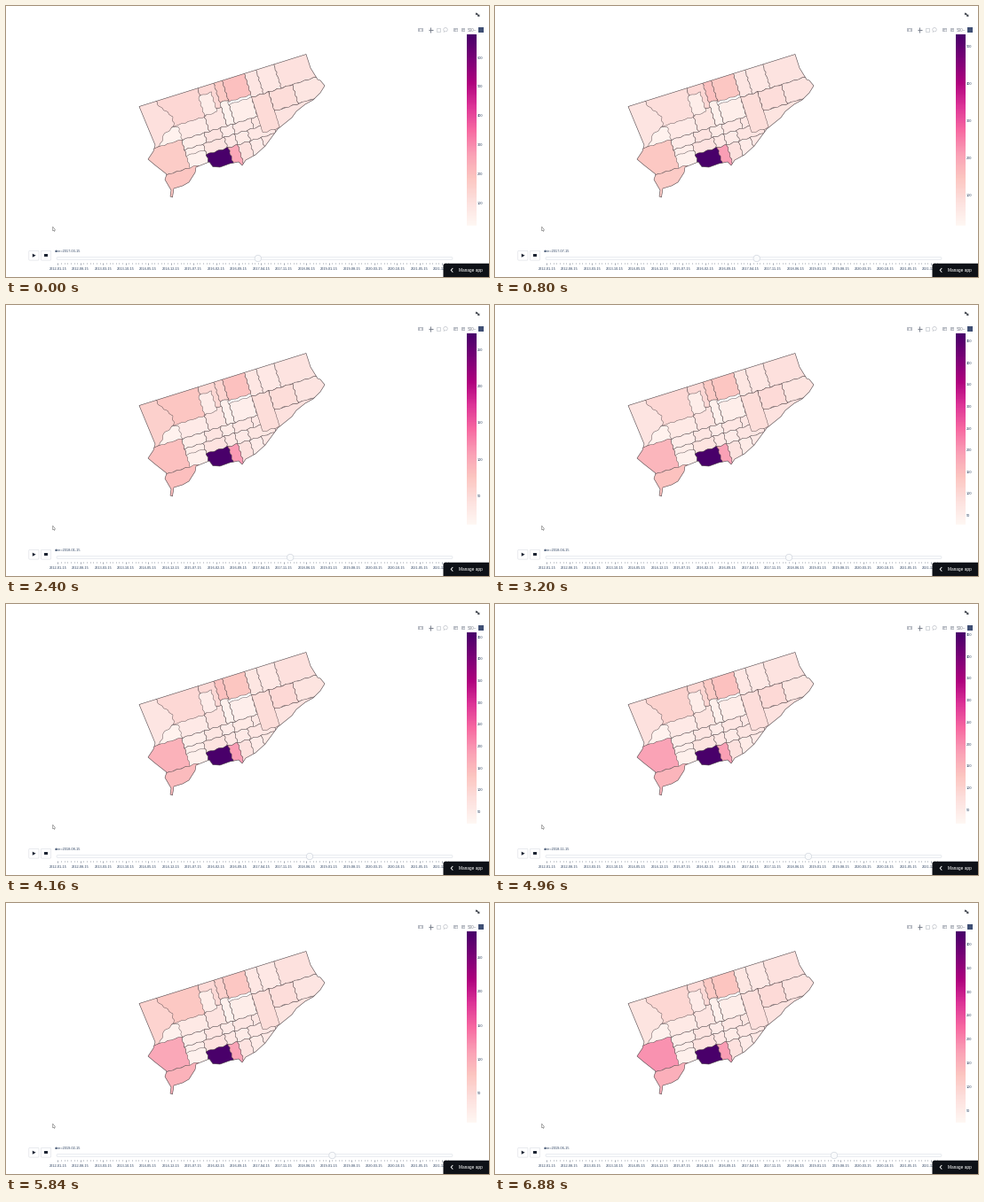
These frames come from a looping animation (544 by 306 pixels, 6.96 s). A matplotlib script:

```python
import numpy as np
import matplotlib
import matplotlib.pyplot as plt
from matplotlib.animation import FuncAnimation
from matplotlib.patches import Circle, FancyBboxPatch, Polygon, Rectangle

W, H, DPI = 544, 306, 100
FRAMES, STEP_MS = 87, 80
PT = 72 / DPI
INK, GREY, EDGE = "#2a3f5f", "#b9bdc5", "#4a4044"
CMAP = matplotlib.colormaps["RdPu"]

plt.rcParams["font.family"] = "Liberation Sans"
fig = plt.figure(figsize=(W / DPI, H / DPI), dpi=DPI, facecolor="white")
ax = fig.add_axes([0, 0, 1, 1])
ax.set_axis_off()


def label(x, y, s, size=3.85, color=INK, ha="left", z=5):
    return ax.text(x, y, s, fontsize=size * PT, color=color, ha=ha,
                   va="center_baseline", zorder=z)


def stroke(xs, ys, color=GREY, lw=0.7, z=5):
    ax.plot(xs, ys, color=color, lw=lw * PT, zorder=z, solid_capstyle="butt")


def box(x, y, w, h, fill="none", edge="none", z=4):
    ax.add_patch(Rectangle((x, y), w, h, fc=fill, ec=edge, lw=0.6 * PT, zorder=z))


def rounded(x, y, w, h, r, fill, edge, z=4):
    ax.add_patch(FancyBboxPatch((x, y), w, h, fc=fill, ec=edge, lw=0.6 * PT, zorder=z,
                                boxstyle=f"round,pad=0,rounding_size={r}"))


# --- monthly values: months counted from January 2012 ---
FIRST, LAST = 62, 89
MONTHS = np.arange(FIRST, LAST + 1)
WINTER = np.maximum(0, np.cos(2 * np.pi * MONTHS / 12)) ** 2
YEARS = np.linspace(0, 1, len(MONTHS))
KEYS = [62, 69, 72, 75, 82, 85, 89]
top = np.interp(MONTHS, KEYS, [680, 422, 272, 468, 455, 288, 427])
bottom = np.interp(MONTHS, KEYS, [21, 16, 11, 28, 18, 7, 24])

# Uneven playback: key months and the frames at which they start
STARTS = np.rint(np.interp(MONTHS[1:], [63, 69, 72, 75, 76, 89],
                           [1, 20, 28, 38, 43, 84]))

# --- map: a street grid (u along the north edge, v towards the lake) ---
COAST = [(150, 113.5), (338, 54.5), (343, 70), (351, 83), (354, 84), (359, 90),
         (354, 98), (346, 106), (337, 111), (327, 119), (322, 126), (306, 139),
         (292, 158), (281, 168), (270, 174), (266, 180), (262, 176), (252, 178),
         (241, 182), (233, 181.5), (229, 176), (214, 182), (213, 188), (206, 199),
         (199, 203), (189, 206), (187.5, 216), (185, 215), (186, 208), (179, 196),
         (181, 190), (167, 179), (160, 173), (166, 164), (168, 157)]
land = ax.add_patch(Polygon(COAST, fc="none", ec=EDGE, lw=0.55 * PT, zorder=3))
rng = np.random.default_rng(7)
areas = []


def to_page(u, v):
    """Grid to pixels, with a slight bend so that borders look surveyed."""
    u, v = u + 0.7 * np.sin(0.9 * v), v + 0.6 * np.sin(0.6 * u)
    return np.column_stack([150 + 0.954 * u + 0.299 * v, 113.5 - 0.299 * u + 0.954 * v])


def area(corners, base=None, winter=0.0, trend=0.0):
    base = rng.uniform(0.05, 0.12) if base is None else base
    ring = np.array(corners + corners[:1], float)
    t = np.linspace(0, len(corners), 12 * len(corners), endpoint=False)
    u, v = (np.interp(t, range(len(ring)), ring[:, i]) for i in (0, 1))
    patch = Polygon(to_page(u, v), ec=EDGE, lw=0.42 * PT, zorder=2)
    ax.add_patch(patch)
    patch.set_clip_path(land)
    noise = 1 + 0.08 * rng.uniform(-1, 1, len(MONTHS))
    areas.append((patch, np.clip((base + winter * WINTER + trend * YEARS) * noise, 0, 1)))


def block(u0, u1, v0, v1, *level):
    area([(u0, v0), (u1, v0), (u1, v1), (u0, v1)], *level)


def row(v0, v1, cuts):
    for u0, u1 in zip(cuts, cuts[1:]):
        block(u0, u1, v0, v1)


row(-5, 28, [124, 138, 159, 215])
row(28, 50.5, [31, 67, 88, 97, 124, 144, 172, 215])
row(50.5, 62, [34, 61, 80, 94, 116, 138])
row(62, 74.5, [34, 56, 81, 93, 108, 138])
row(74.5, 105, [93, 107, 121, 150])
block(138, 215, 50.5, 90)
block(124, 144, 28, 70, 0.14)
block(144, 172, 28, 50.5, 0.15)
block(20, 69, -5, 33, 0.14, 0.10, 0.04)
block(69, 88, -5, 28, 0.16)
block(88, 98, -5, 23, 0.25, -0.06)
block(98, 124, -5, 25, 0.26)
block(67, 82, 9, 32, 0.06)
block(88, 97, 23, 50.5, 0.04)
block(8, 35, 34, 50.5, 0.03)
area([(-5, -5), (20, -5), (20, 3), (32, 22), (31, 33), (18, 38), (8, 50), (-5, 50)],
     0.10, 0.10)
block(30, 56, 69, 100, 0.04)
block(-15, 34, 50, 83, 0.23, 0.0, 0.15)
block(-15, 44, 83, 125, 0.23, 0.03, 0.08)
block(56, 82, 74.3, 100, 1.1)
block(82, 93, 74.5, 100, 0.36)

# --- colour bar ---
BAR_TOP, BAR_END = 32, 248
ax.imshow(np.linspace(1, 0, 256)[:, None], cmap=CMAP, aspect="auto",
          extent=(518.7, 529.7, BAR_END, BAR_TOP), zorder=2)
marks = [label(530.6, 0, "") for _ in range(10)]

# --- toolbar ---
for x, y, d in ((529.3, 8, 1.9), (533, 11.7, -1.9)):
    stroke([x, x + d, x, x, x + d], [y, y + d, y, y + d, y], "#50545c", 0.8)
box(464.4, 25.4, 5.4, 3.8, GREY)
box(466, 24.6, 2.2, 1, GREY)
ax.add_patch(Circle((467.1, 27.3), 1.2, fc="white", ec="none", zorder=5))
stroke([475.5, 481.3], [27, 27], "#7d838f", 1)
stroke([478.4, 478.4], [24.1, 29.9], "#7d838f", 1)
box(484.5, 24.8, 4.6, 4.4, edge=GREY)
ax.add_patch(Circle((495, 26.7), 2.2, fc="none", ec=GREY, lw=0.6 * PT, zorder=4))
stroke([493.6, 493], [28.5, 29.8])
for x in (504.2, 512.6):
    box(x, 24.6, 4.8, 4.8, GREY)
    stroke([x + 1, x + 3.8], [27, 27], "white")
stroke([506.6, 506.6], [25.6, 28.4], "white")
label(519.3, 27, "500\u2013", 4.6, "#7d838f")
box(532.3, 24.4, 5.2, 5.2, "#3f4f75")

# --- buttons and slider ---
for x in (25.8, 39.4):
    rounded(x, 276.3, 11.2, 10.8, 1, "white", "#dcdfe5")
ax.add_patch(Polygon([(29.8, 279.6), (33.6, 281.7), (29.8, 283.8)], fc="#1c2433",
                     ec="none", zorder=5))
box(43.4, 280.1, 3.2, 3.2, "#1c2433")

X0, DX = 58.4, 25.45 / 7
rounded(57, 283.6, 446, 2.8, 1.3, "#fafbfc", "#dfe3ea")


def date(m):
    return f"{2012 + m // 12}-{m % 12 + 1:02d}-15"


for m in range(122):
    x, major = X0 + DX * m, m % 7 == 0
    stroke([x, x], [290, 292.3 if major else 291.3], "#4a5568", 0.55)
    if major:
        label(x, 296.9, date(m), ha="center")
current = label(54.5, 276.7, "")
handle = ax.add_patch(Circle((X0, 285), 3.7, fc="#fafbfc", ec="#d3d8e0",
                             lw=0.7 * PT, zorder=6))

# --- app badge and pointer ---
rounded(492.5, 290.7, 60, 24, 2.5, "#0e1117", "none", z=8)
stroke([503.3, 501.2, 503.3], [296, 298.3, 300.6], "white", 0.9, 9)
label(510, 298.4, "Manage app", 4.7, "white", z=9)
ax.add_patch(Polygon([(52.7, 249.2), (52.7, 254), (53.8, 253), (54.7, 254.6),
                      (55.3, 252.6)], fc="white", ec="#666666", lw=0.5 * PT, zorder=9))

ax.set_xlim(0, W)
ax.set_ylim(H, 0)


def ease(u):
    return 4 * u**3 if u < 0.5 else 1 - (2 - 2 * u)**3 / 2


def draw(frame):
    i = int(np.searchsorted(STARTS, frame, side="right"))
    month = FIRST + i
    pos = float(month)
    if i:
        pos += ease(min(1, (frame - STARTS[i - 1]) * STEP_MS / 150)) - 1
    handle.center = (X0 + DX * pos, 285)
    current.set_text(f"date={date(month)}")

    for patch, levels in areas:
        patch.set_facecolor(CMAP(float(levels[i])))

    lo, hi = bottom[i], top[i]
    step = 100 if hi - lo > 500 else 50
    for k, mark in enumerate(marks, 1):
        v = k * step
        shown = lo <= v <= hi
        mark.set_text(str(v) if shown else "")
        mark.set_y(BAR_END - (v - lo) / (hi - lo) * (BAR_END - BAR_TOP) if shown else 0)
    return []


anim = FuncAnimation(fig, draw, frames=FRAMES, interval=STEP_MS, repeat=True,
                     repeat_delay=0, blit=False)
plt.show()
```
